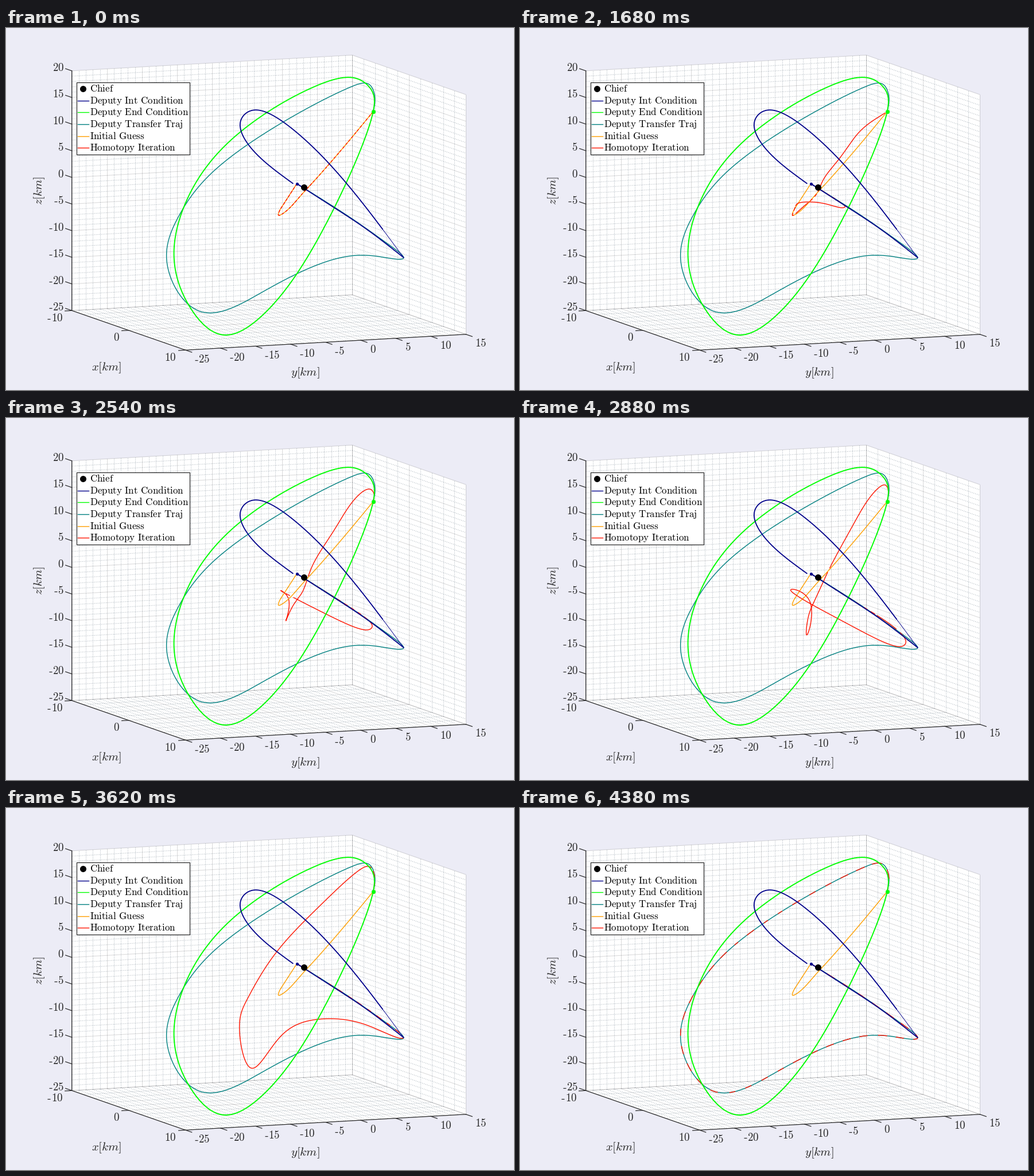
Write a matplotlib script that moves like this. It is 885 px wide and 632 px high and loops after 5 s.

```python
import numpy as np
import matplotlib.pyplot as plt
from matplotlib.animation import FuncAnimation
from matplotlib.collections import LineCollection
from matplotlib.patches import Polygon, Rectangle

plt.rcParams["mathtext.fontset"] = "cm"

W, H, DPI = 885, 632, 100
PX = 72 / DPI                      # points per pixel
STEP, FRAMES = 20, 250             # ms per frame, frames per loop
INK = "#262626"
NAVY, GREEN, TEAL, ORANGE, RED = "#00008b", "#00ff00", "#008080", "#ff9f00", "#ff1400"

fig = plt.figure(figsize=(W / DPI, H / DPI), dpi=DPI, facecolor="#ececf6")
ax = fig.add_axes([0, 0, 1, 1])
ax.set_xlim(0.3, W + 0.3)
ax.set_ylim(H + 0.2, 0.2)
ax.axis("off")


def project(x, y, z):
    """Orthographic view of the axes box, in pixels."""
    return (115 + 9.9 * (x + 10) + 12.2125 * (y + 25),
            493.5 + 3.45 * (x + 10) - 0.6875 * (y + 25) - 9.3 * (z + 25))


def stroke(pts, color, width, z=5, **kw):
    pts = np.asarray(pts, float)
    return ax.plot(pts[:, 0], pts[:, 1], color=color, lw=width * PX, zorder=z, **kw)[0]


def dot(x, y, radius, color, z):
    ax.plot([x], [y], "o", ms=2 * radius * PX, mew=0, color=color, zorder=z)


# ---- axes box ----
def grid(xs, ys, zs):
    lines = []
    for x in xs:
        lines.append([project(x, 15, -25), project(x, 15, 20)])
        lines.append([project(x, -25, -25), project(x, 15, -25)])
    for y in ys:
        lines.append([project(-10, y, -25), project(-10, y, 20)])
        lines.append([project(-10, y, -25), project(10, y, -25)])
    for z in zs:
        lines.append([project(-10, -25, z), project(-10, 15, z)])
        lines.append([project(-10, 15, z), project(10, 15, z)])
    return lines


walls = [(-10, -25, 20), (-10, 15, 20), (10, 15, 20),
         (10, 15, -25), (10, -25, -25), (-10, -25, -25)]
ax.add_patch(Polygon([project(*c) for c in walls], fc="white", ec="none", zorder=0))

minor = grid([x for x in range(-10, 11, 2) if x % 10],
             [y for y in range(-25, 16) if y % 5],
             [z for z in range(-25, 21) if z % 5])
major = grid(range(-10, 11, 10), range(-25, 16, 5), range(-25, 21, 5))
ax.add_collection(LineCollection(minor, colors=[(0.1, 0.2, 0.28, 0.42)], lw=PX,
                                 linestyles=[(0, (1, 2))], zorder=1))
ax.add_collection(LineCollection(major, colors=[(0.1, 0.1, 0.12, 0.17)], lw=PX, zorder=1))
stroke([project(-10, -25, 20), project(-10, -25, -25), project(10, -25, -25),
        project(10, 15, -25)], INK, 1.2, 2)

EM = 18.9


def number(x, base, n, right):
    """Tick label with its left or right end at x."""
    digits = str(abs(n))
    width = EM * (0.5 * len(digits) + (0.333 if n < 0 else 0))
    left = x - width if right else x
    if n < 0:
        y = base - 0.216 * EM
        stroke([(left + 0.011 * EM, y), (left + 0.276 * EM, y)], INK, 1.2,
               solid_capstyle="butt")
        left += 0.333 * EM
    ax.text(left, base, rf"$\mathrm{{{digits}}}$", size=EM * PX, color=INK,
            ha="left", va="baseline")


def tick(at, step, offset, n, right):
    x, y = at
    stroke([at, (x + step[0], y + step[1])], INK, 1.2, 2)
    number(x + offset[0], y + offset[1], n, right)


for n in range(-25, 21, 5):
    tick(project(-10, -25, n), (-11, -3.8), (-15, 0), n, True)
for n in range(-10, 11, 10):
    tick(project(n, -25, -25), (-12, 0.7), (-17.3, 18.3), n, True)
for n in range(-25, 16, 5):
    tick(project(10, n, -25), (11, 3.8), (16, 21.7), n, False)

for x, y, name, turn in [(175.5, 593, "x", 0), (521, 602, "y", 0), (58, 284, "z", 90)]:
    ax.text(x, y, f"${name}[km]$", size=20.8 * PX, color=INK, rotation=turn,
            ha="center", va="center")

# ---- legend ----
ax.add_patch(Rectangle((123, 95.5), 197.5, 126, fc="white", ec=INK, lw=1.2 * PX, zorder=3))
entries = [("Chief", None), ("Deputy Int Condition", NAVY),
           ("Deputy End Condition", GREEN), ("Deputy Transfer Traj", TEAL),
           ("Initial Guess", ORANGE), ("Homotopy Iteration", RED)]
for i, (name, color) in enumerate(entries):
    y = 105.7 + 20.65 * i
    if color:
        stroke([(125.5, y + 0.6), (144.5, y + 0.6)], color, 1.4)
    else:
        dot(134.5, y + 0.3, 5.5, "black", 5)
    words = name.replace(" ", r"\hspace{0.38}")
    ax.text(146, y + 5.6, rf"$\mathrm{{{words}}}$", size=17.05 * PX, color="black",
            ha="left", va="baseline", zorder=5)


# ---- curves ----
def spline(pts, n=24):
    """Natural cubic spline with n samples between neighbouring points."""
    p = np.array(pts, float)
    h = np.sqrt(np.hypot(*np.diff(p, axis=0).T))
    slope = np.diff(p, axis=0) / h[:, None]
    a, rhs = np.eye(len(p)), np.zeros_like(p)
    for i in range(1, len(p) - 1):
        a[i, i - 1:i + 2] = h[i - 1], 2 * (h[i - 1] + h[i]), h[i]
        rhs[i] = 6 * (slope[i] - slope[i - 1])
    m = np.linalg.solve(a, rhs)[:, None]
    p, h = p[:, None], h[:, None, None]
    s = (np.arange(n) / n)[None, :, None]
    r = 1 - s
    out = r * p[:-1] + s * p[1:] + h**2 / 6 * ((r**3 - r) * m[:-1] + (s**3 - s) * m[1:])
    return np.vstack([out.reshape(-1, 2), p[-1]])


def closed_spline(pts, n=24):
    return spline(pts[-4:] + pts + pts[:5], n)[4 * n:-4 * n]


START, END, CUSP = (507, 272), (640, 146), (693, 401)

end_orbit = closed_spline([END, (636, 107), (605, 87), (530, 106), (430, 165), (340, 256),
                           (293, 387), (321, 488), (378, 536), (450, 499), (550, 357)])
start_orbit = spline([CUSP, (594, 272), (500, 177), (432, 143.5), (408.5, 165),
                      (430, 213), (500, 271.5)])
start_leg = spline([START, (570, 312.5), (630, 352.5), CUSP])


def guess_points():
    """Straight down to a turn, then a slightly bowed line up to the end."""
    u = np.linspace(0, 1, 8)
    up = np.linspace((490, 318.5), END, 8)
    up[:, 1] += 3.5 * np.sin(np.pi * u)
    return np.vstack([np.linspace(START, (478, 317), 8), [(475, 327)], up])


# Each pose runs: out to the right turn, back to the lower turn, up to the end.
def pose(out, back, up):
    return np.array([START, *out, *back, *up, END], float)


guess = guess_points()
bent = guess.copy()
bent[1:6] = [(513, 276), (519, 280), (524, 286), (516, 284), (502, 281.5)]
wavy = pose([(560, 305), (588, 323), (602, 334)],
            [(597, 339), (548, 326.5), (486, 303), (480, 313), (475, 328)],
            [(497, 307), (520, 288), (526, 258), (560, 210), (600, 152), (630, 132), (640, 136)])
looped = pose([(600, 331), (650, 364), (672.5, 390)],
              [(665, 399), (570, 359), (472, 300), (504, 318), (500, 379)],
              [(502, 350), (514, 318), (540, 262), (580, 188), (612, 136), (636, 117), (642, 128)])
spiked = pose([(600, 331), (664, 375.5), (692, 400.5)],
              [(685, 402), (620, 367), (545, 328), (510, 333), (484.5, 423)],
              [(497, 362), (512, 322), (540, 266), (590, 175), (621, 119), (636, 107), (642, 122)])
opened = pose([(600, 331), (664, 376), CUSP],
              [(686, 402), (628, 387.5), (550, 407), (450, 460), (375, 484)],
              [(322.5, 402), (336, 343), (400, 248), (510, 164), (600, 107), (632, 98.5), (643, 121)])
transfer = pose([(600, 331), (664, 376), CUSP],
                [(686, 404), (628, 397), (550, 411), (450, 459.5), (340, 495.5)],
                [(281, 412), (300, 331), (360, 252), (500, 154.5), (600, 103.5), (632, 98), (643, 121)])

times = [0, 1080, 2180, 2880, 3300, 3920, 4380]
poses = [guess, bent, wavy, looped, spiked, opened, transfer]

stroke(spline(transfer), TEAL, 1.4, 5)
stroke(spline(guess), ORANGE, 1.4, 6)
iteration = stroke(spline(guess), RED, 1.4, 7)
stroke(end_orbit, GREEN, 1.9, 8)
stroke(start_orbit[9:], NAVY, 1.8, 9)
stroke(start_orbit[:10], NAVY, 0.9, 9)
stroke(start_leg, NAVY, 1.8, 9)
dot(*START, 2.6, NAVY, 10)
dot(*END, 3.6, GREEN, 10)
dot(519, 278, 5.5, "black", 11)

others = np.vstack([spline(transfer, 48), spline(guess)])


def path_at(ms):
    i = min(np.searchsorted(times, ms, side="right") - 1, len(times) - 2)
    u = min((ms - times[i]) / (times[i + 1] - times[i]), 1)
    if i == len(times) - 2:
        u = 1 - (1 - u) ** 2       # settles on the transfer path
    return spline(poses[i] + u * (poses[i + 1] - poses[i]))


def update(frame):
    ms = min(frame * STEP, times[-1])
    c = path_at(ms)
    # where the path lies on another curve, the two show in alternating patches
    gap = np.hypot(c[:, None, 0] - others[:, 0], c[:, None, 1] - others[:, 1]).min(axis=1)
    s = np.r_[0, np.cumsum(np.hypot(*np.diff(c, axis=0).T))]
    under = np.sin(s * (0.8 - 0.6 * ms / times[-1])) < -0.1
    c[(gap < 1.3) & under] = np.nan
    iteration.set_data(c[:, 0], c[:, 1])
    return [iteration]


anim = FuncAnimation(fig, update, frames=FRAMES, interval=STEP, repeat=True,
                     repeat_delay=0, blit=False)
plt.show()
```
